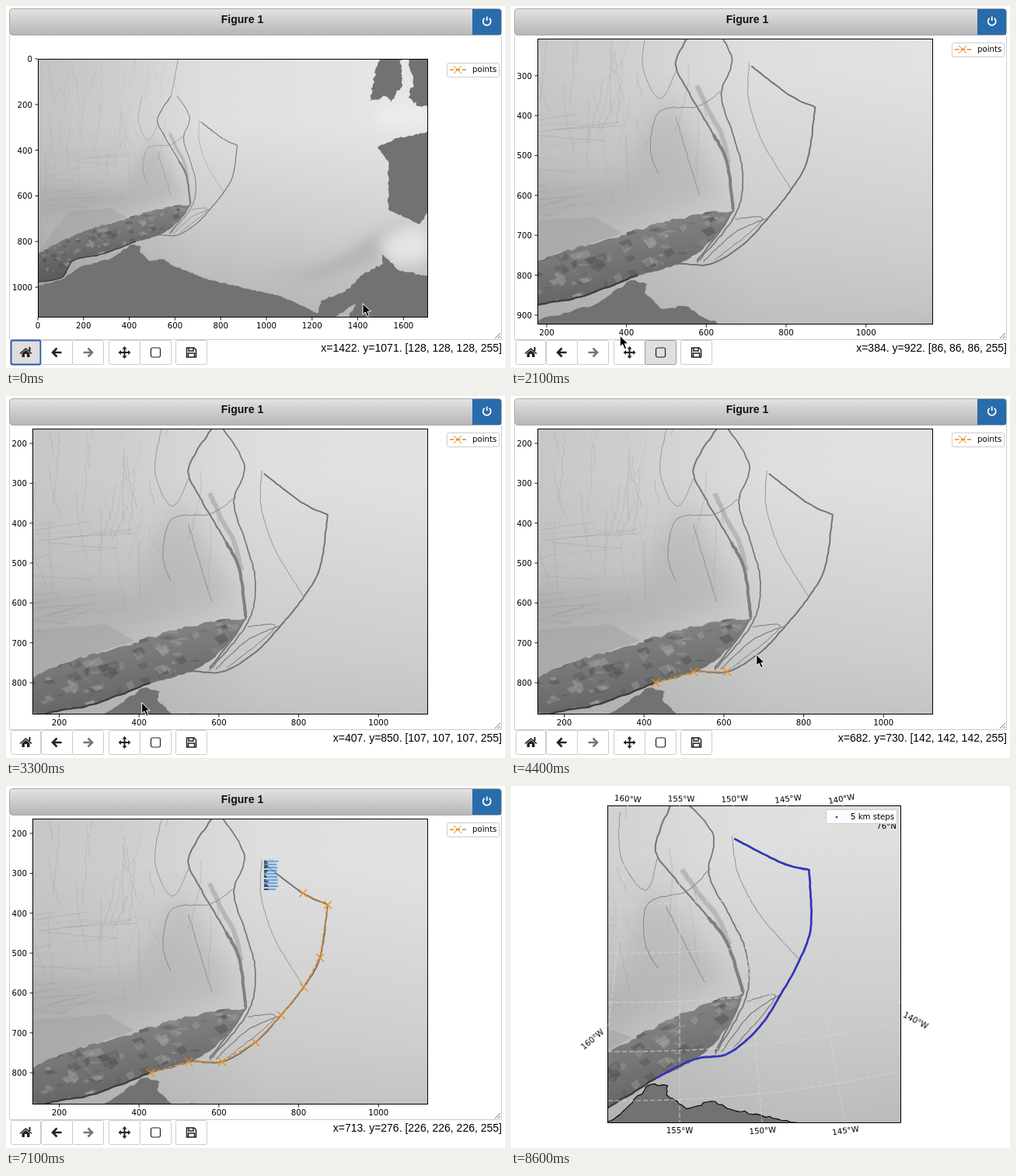
Write an HTML page that moves like this. It is 642 px wide and 466 px high and loops after 9000 ms.

```html
<!DOCTYPE html>
<html lang="en">
<head>
<meta charset="utf-8">
<title>Figure 1</title>
<style>
html, body { margin: 0; width: 100%; height: 100%; overflow: hidden; background: #fff; }
svg { display: block; }
.plot { font: 10.2px "DejaVu Sans", sans-serif; }
.ui { font: 14px "Liberation Sans", Arial, sans-serif; }
</style>
</head>
<body>
<svg id="stage" width="642" height="466" viewBox="0 0 642 466"></svg>
<script>
const LOOP = 9000, MAP_START = 7700, CLICK_START = 3400, CLICK_GAP = 415;
const ORANGE = '#e68a1c', STRIPES_START = 5100;
const stage = document.getElementById('stage');

let seed = 7;
const rnd = () => (seed = (seed * 16807) % 2147483647) / 2147483647;
const span = (a, b) => a + (b - a) * rnd();
const clamp = (v, lo, hi) => Math.min(hi, Math.max(lo, v));
const repeat = (n, f) => Array.from({ length: n }, (_, i) => f(i)).join('');
const parse = s => s.split(' ').map(p => p.split(',').map(Number));

// Roughened curve through a few points; bend 0 keeps the segments straight.
function rough(points, amp = .6, bend = 1, step = 5) {
  const at = i => points[clamp(i, 0, points.length - 1)];
  const out = [at(0)];
  for (let i = 0; i < points.length - 1; i++) {
    const a = at(i), b = at(i + 1), before = at(i - 1), after = at(i + 2);
    const n = Math.ceil(Math.hypot(b[0] - a[0], b[1] - a[1]) / step);
    for (let k = 1; k <= n; k++) {
      const u = k / n, h = u * u * (3 - 2 * u), noise = k < n ? amp : 0;
      out.push([0, 1].map(c => a[c] + (b[c] - a[c]) * (bend ? h : u)
        + bend / 2 * ((b[c] - before[c]) * u * (1 - u) ** 2 - (after[c] - a[c]) * u * u * (1 - u))
        + span(-noise, noise)));
    }
  }
  return 'M' + out.map(p => p.map(v => v.toFixed(1)).join()).join('L');
}
const crack = (points, width, color = '#777', opacity = 1, amp = .6) =>
  `<path d="${rough(points, amp)}" fill="none" stroke="${color}" stroke-width="${width}" opacity="${opacity}"/>`;
const land = (points, amp = 1.2) =>
  `<path class="land" d="${rough(parse(points), amp, 0, 3)}Z" fill="#727272"/>`;
const text = (x, y, s, anchor = 'middle', extra = '') =>
  `<text x="${x}" y="${y}" text-anchor="${anchor}" ${extra}>${s}</text>`;

// The lead that gets digitised: crack, clicked points and final line.
const LEAD = parse('186,369 235,355 278,355 321,330 354,295 383,259 404,221 414,153 382,138 332,100');
const TIP = 7;
const leadPath = () => rough(LEAD.slice(0, TIP + 1), .4) + rough(LEAD.slice(TIP), .4).replace('M', 'L');
const MAIN = parse('265,42 235,93 250,131 283,188 300,222 309,285');
const SHORE = parse('-34,460 20,450 46,412 112,397 186,369');
const BAND_TOP = parse('309,285 235,297 150,322 69,346 -34,395');
const BAND_END = parse('186,369 248,350 292,312 309,285');

function fineLines() {
  const upright = repeat(60, () => {
    const x = span(-20, 275), y = span(-70, 190), len = span(30, 100), lean = span(-25, 20);
    return crack([[x, y], [x + lean * .3, y + len / 2], [x + lean, y + len]], .8, '#858585', span(.1, .4), 1.5);
  });
  const flat = repeat(24, () => {
    const x = span(-34, 90), y = span(170, 310);
    return crack([[x, y], [x + span(50, 130), y + span(-24, 10)]], .8, '#888', span(.15, .4), .8);
  });
  return upright + flat;
}
const bandTexture = () => repeat(170, () => {
  const x = span(-34, 305), y = 393 - x * .27 + span(-42, 42), a = span(4, 14), b = span(2, 9);
  return `<path d="M${x},${y}l${a},${-b * .6} ${a * .4},${b} ${-a * .8},${b * .7}Z" fill="${rnd() < .55 ? '#4c4c4c' : '#a4a4a4'}" opacity="${span(.15, .55)}"/>`;
});

// Zoomed stage pixels to image coordinates.
const FROM_PIXELS = 'matrix(1.947 0 0 1.947 66.6 81.2)';

// Ice scene in image coordinates, 1705 by 1130.
function scene() {
  return `
  <rect width="1705" height="1130" fill="url(#across)"/>
  <rect width="1705" height="1130" fill="url(#down)"/>
  <g filter="url(#soft)">
    <path d="M1000,960Q1250,930 1380,830T1640,700L1540,860 1240,960Z" fill="#999" opacity=".4"/>
    <ellipse cx="1610" cy="820" rx="110" ry="80" fill="#eee" opacity=".7"/>
    <ellipse cx="1600" cy="250" rx="130" ry="60" fill="#f0f0f0" opacity=".6"/>
    <path d="M500,340L640,600 400,660 0,700 0,560 380,560Z" fill="#999" opacity=".3"/>
  </g>
  <g transform="${FROM_PIXELS}" stroke-linejoin="round">
    ${fineLines()}
    <path d="${rough(parse('-34,395 34,301 130,294 165,315 69,346'), 1, 0)}Z" fill="#a2a2a2" opacity=".55"/>
    ${crack(parse('262,125 278,160 294,190 303,225'), 6, '#b0b0b0', .8)}
    <g clip-path="url(#bandClip)">
      <rect x="-40" y="260" width="360" height="210" fill="url(#bandFill)"/>
      ${bandTexture()}
    </g>
    ${crack(SHORE, 2.4, '#3d3d3d')}
    ${crack(MAIN, 2)}
    ${crack(MAIN.slice(3), 4, '#808080')}
    ${crack(parse('309,285 292,312 262,350'), 2)}
    ${crack(parse('282,-72 280,-35 265,42'), 1.3, '#888')}
    ${crack(parse('279,42 307,90 293,137 309,190 321,240 311,292 262,353'), 1.7)}
    <path d="${leadPath()}" fill="none" stroke="#707070" stroke-width="1.9"/>
    ${crack(parse('329,96 328,140 345,195 383,259'), .9, '#909090')}
    ${crack([LEAD[4], [310, 315], [270, 352]], 1.1)}
    ${crack([[311, 297], [346, 298], [285, 350]], 1)}
    ${crack(parse('296,130 262,152 214,158 202,205 212,238'), 1, '#8a8a8a')}
    ${crack(parse('236,105 214,142 192,100 200,42'), .9, '#929292')}
    ${crack(parse('235,165 248,210 265,265'), 1, '#909090')}
  </g>
  <g transform="scale(3.4) translate(-41 -68)">
    ${land('36,362 75,351 95,336 135,325 162,307 174,310 172,316 184,328 202,326 212,333 262,353 355,374 415,402 36,402', .8)}
    ${land('400,402 405,380 437,367 460,345 485,332 484,319 505,340 545,349 545,402 440,402 450,384 420,402')}
    ${land('545,161 505,170 478,182 492,200 492,262 532,281 545,262')}
    ${land('480,66 468,122 488,116 496,124 510,100 508,66', 2)}
    ${land('518,66 524,100 518,118 530,129 545,130 545,66', 2)}
  </g>`;
}

const ICONS = {
  home: '<path d="M-8,1L0,-6 8,1 7,2 0,-4-7,2ZM4,-7h2v5h-2ZM-5,1L0,-3 5,1V6H1.5V2h-3v4H-5Z"/>',
  back: '<path d="M6,0H-5M0,-5.5L-5.5,0 0,5.5" fill="none" stroke="currentColor" stroke-width="2.6"/>',
  forward: '<path d="M-6,0H5M0,-5.5L5.5,0 0,5.5" fill="none" stroke="currentColor" stroke-width="2.6"/>',
  move: '<path d="M0,-8L3,-4.5H1V-1H4.5V-3L8,0 4.5,3V1H1V4.5H3L0,8-3,4.5H-1V1H-4.5V3L-8,0-4.5,-3V-1H-1V-4.5H-3Z"/>',
  rect: '<rect x="-6" y="-6" width="12" height="12" rx="2" fill="none" stroke="currentColor" stroke-width="1.2"/>',
  save: '<path d="M-6,-6H3.5L6,-3.5V6H-6ZM-3.5,-6v4h6v-4M-4,6V1H4v5" fill="none" stroke="currentColor" stroke-width="1.5"/>'
};
const button = (id, x, width = 41, color = '#222') => `
  <rect id="${id}" x="${x + .5}" y="430.5" width="${width - 1}" height="31" rx="2" fill="#fff" stroke="#ccc"/>
  <g transform="translate(${x + width / 2} 446)" fill="${color}" color="${color}">${ICONS[id]}</g>`;
const marker = ([x, y]) => `M${x - 5},${y - 5}l10,10m0,-10l-10,10`;

const CURSORS = {
  arrow: '<path d="M0,0V14L3.3,11 6,17 8.5,16 6,10.2H10.5Z" fill="#000" stroke="#fff"/>',
  cross: '<path d="M-7,3H7M0,-4V10" stroke="#fff" stroke-width="3"/><path d="M-6,3H6M0,-3V9" stroke="#000"/>',
  grab: `<path d="M0,-9L9,0 0,9-9,0Z" fill="#fff"/>${ICONS.move}`,
  stripes: repeat(20, i => `<path d="M0,${i * 2 - 5}H${span(13, 19)}" stroke="${i % 2 ? '#3d86d6' : '#a9d0f3'}" stroke-width="1.3"/>`
    + (i % 3 ? `<path d="M0,${i * 2 - 5}h${span(2, 6)}" stroke="#111" stroke-width="1.2"/>` : ''))
};

const degrees = (x, y, value, turn) =>
  text(x, y, value + '°W', 'middle', `transform="rotate(${turn} ${x} ${y})"`);
const parallels = repeat(6, i => {
  const y = 89 + i * 63.2;
  return `M125,${y}Q320,${y + 2} 501,${y - 38}`;
});
const meridians = 'M150,25Q143,170 125,310M427,25Q457,150 501,280'
  + repeat(3, i => `M${217 + i * 69},25Q${217 + i * 88},215 ${217 + i * 106},433`);
const mapLabels = repeat(5, i => degrees(150 + i * 69, 20, 160 - i * 5, 4 - i * 3.5))
  + repeat(3, i => degrees(217 + i * 107, 447, 155 - i * 5, -i * 4))
  + degrees(107, 329, 160, -40) + degrees(519, 305, 140, 28);

const MAP_MATRIX = [.5346, -.0969, .0969, .5346, -119.8, -10.1];

stage.innerHTML = `
<defs>
  <linearGradient id="across">
    <stop offset="0" stop-color="#c3c3c3"/><stop offset=".2" stop-color="#cdcdcd"/>
    <stop offset=".42" stop-color="#dedede"/><stop offset="1" stop-color="#e7e7e7"/>
  </linearGradient>
  <linearGradient id="down" x2="0" y2="1">
    <stop offset=".25" stop-opacity="0"/><stop offset=".65" stop-opacity=".09"/><stop offset="1" stop-opacity=".2"/>
  </linearGradient>
  <linearGradient id="bandFill" x2=".28" y2="1">
    <stop offset=".2" stop-color="#8c8c8c"/><stop offset=".6" stop-color="#707070"/><stop offset=".85" stop-color="#5c5c5c"/>
  </linearGradient>
  <linearGradient id="bar" x2="0" y2="1"><stop stop-color="#e3e3e3"/><stop offset="1" stop-color="#b5b5b5"/></linearGradient>
  <filter id="soft"><feGaussianBlur stdDeviation="28"/></filter>
  <clipPath id="bandClip"><path d="${rough(SHORE, 0) + rough(BAND_END, 1).replace('M', 'L') + rough(BAND_TOP, 2).replace('M', 'L')}Z"/></clipPath>
  <clipPath id="axesClip"><rect id="clip"/></clipPath>
</defs>
<rect width="642" height="466" fill="#fff"/>
<g clip-path="url(#axesClip)"><g id="image">${scene()}</g></g>
<rect id="axes" fill="none" stroke="#000"/>
<g id="notebook">
  <path d="M4.5,38V429.5H637.5V38" fill="none" stroke="#ccc"/>
  <path d="M629,428l7,-7M633,428l3,-3" stroke="#777"/>
  <rect x="4.5" y="3.5" width="633" height="34" rx="4" fill="url(#bar)" stroke="#aaa"/>
  <path d="M600,4H634q3,0 3,3V37H600Z" fill="#286cab"/>
  <path d="M615.7,15.8a5 5 0 1 0 6,0M618.7,13.5v5.5" fill="none" stroke="#fff" stroke-width="1.7"/>
  <g class="ui">
    ${text(304, 22, 'Figure 1', 'middle', 'font-weight="bold" fill="#111"')}
    <text id="status" x="638" y="445" text-anchor="end"></text>
  </g>
  ${button('home', 6, 39)}${button('back', 45)}${button('forward', 85, 41, '#777')}
  ${button('move', 132)}${button('rect', 172)}${button('save', 218)}
  <g id="ticks" class="plot"></g>
  <g id="legend" class="plot">
    <rect x="567.5" y="-8.5" width="67" height="18" rx="2" fill="#fff" stroke="#ccc"/>
    <path d="M571,0h21" stroke="${ORANGE}" stroke-width="1.5" stroke-dasharray="5.5 2.4"/>
    <path d="${marker([581, 0])}" stroke="${ORANGE}"/>
    ${text(600, 3, 'points', 'start')}
  </g>
  <path id="line" fill="none" stroke="${ORANGE}" stroke-width="1.5" stroke-dasharray="5.5 2.4"/>
  <path id="marks" fill="none" stroke="${ORANGE}" stroke-width="1.2"/>
  <rect id="rubber" fill="none" stroke="#000"/>
  <g id="cursor"></g>
</g>
<g id="map" class="plot">
  <path d="${meridians}${parallels}" fill="none" stroke="#d9d9d9" stroke-width="1.2" stroke-dasharray="6 3" opacity=".7"/>
  <g transform="matrix(${MAP_MATRIX}) ${FROM_PIXELS}">
    <path d="${leadPath()}" fill="none" stroke="#3333bd" stroke-width="2.5" stroke-linecap="round" stroke-linejoin="round"/>
  </g>
  ${text(483, 55, '76°N')}
  <rect x="405.5" y="30.5" width="91" height="18" rx="2" fill="#fff" fill-opacity=".9" stroke="#ccc"/>
  <circle cx="419" cy="40" r="1.5" fill="#4a4ac4"/>
  ${text(437, 43, '5 km steps', 'start')}
  ${mapLabels}
</g>`;

const el = {};
stage.querySelectorAll('[id]').forEach(e => el[e.id] = e);
const set = (e, attrs) => { for (const k in attrs) e.setAttribute(k, attrs[k]); };
const show = (e, on) => set(e, { display: on ? 'inline' : 'none' });

const CORNER = [384, 129], GRAB_X = 149;
const TOOLS = [
  [0, 459, 383], [400, 193, 446], [900, ...CORNER], [1000, ...CORNER], [1500, 138, 288], [1700, 93, 339],
  [2200, 152, 446], [2500, GRAB_X, 343], [2700, 159, 353], [2900, 171, 365], [3100, 152, 446], [CLICK_START, ...LEAD[0]]
];
const clickTime = i => CLICK_START + i * CLICK_GAP;
const MISS = [6100, 427, 182];
const CLICKS = LEAD.map((p, i) => [clickTime(i), ...p]);
CLICKS.splice(TIP, 0, MISS);

const linear = u => u, easeOut = u => 1 - (1 - u) ** 4;
// Interpolates rows of [time, x, y].
function follow(rows, t, ease) {
  const i = rows.findIndex(r => r[0] > t);
  if (i < 0) return rows[rows.length - 1].slice(1);
  const [t0, ...a] = rows[i - 1], [t1, ...b] = rows[i], u = ease((t - t0) / (t1 - t0));
  return a.map((v, k) => v + (b[k] - v) * u);
}
const pointer = t => t < CLICK_START ? follow(TOOLS, t, linear) : follow(CLICKS, t, easeOut);

function drawAxes([x, y, width, height], matrix) {
  set(el.axes, { x: x + .5, y: y + .5, width, height });
  set(el.clip, { x, y, width, height });
  set(el.image, { transform: `matrix(${matrix})` });
}
function drawTicks([x, y, w, h], [s, , , , ox, oy], yStep) {
  const bottom = y + h, tick = d => `<path d="${d}" stroke="#000" stroke-width=".9"/>`;
  let out = '';
  for (let v = 0; v <= 1700; v += 200) {
    const px = ox + v * s;
    if (px >= x - 1 && px <= x + w) out += tick(`M${px},${bottom + 1}v3.5`) + text(px, bottom + 15, v);
  }
  for (let v = 0; v <= 1100; v += yStep) {
    const py = oy + v * s;
    if (py >= y - 1 && py <= bottom) out += tick(`M${x},${py}h-3.5`) + text(x - 7, py + 4, v, 'end');
  }
  el.ticks.innerHTML = out;
}
function drawStatus([x, y, w, h], [s, , , , ox, oy], px, py) {
  const dx = Math.round((clamp(px, x, x + w) - ox) / s);
  const dy = Math.round((clamp(py, y, y + h) - oy) / s);
  const gray = dy > 1000 ? 128 : Math.round(226 - .29 * Math.max(0, dy - 440));
  el.status.textContent = `x=${dx}. y=${dy}. [${gray}, ${gray}, ${gray}, 255]`;
}
function highlight(button, on, stroke = '#999') {
  set(button, { fill: on ? '#dedede' : '#fff', stroke: on ? stroke : '#ccc' });
}
function drawPoints(t, hand) {
  const points = LEAD.filter((_, i) => clickTime(i) <= t);
  if (t >= MISS[0] && t < clickTime(TIP)) points.push(hand);
  set(el.line, { d: points.length ? 'M' + points.join('L') : '' });
  set(el.marks, { d: points.map(marker).join('') });
}

function render(t) {
  const onMap = t >= MAP_START;
  show(el.notebook, !onMap);
  show(el.map, onMap);
  stage.querySelectorAll('.land').forEach(e => set(e, { stroke: onMap ? '#000' : 'none', 'stroke-width': .6 }));
  if (onMap) return drawAxes([124, 25, 377, 408], MAP_MATRIX);

  const zoomed = t >= 1800, [x, y] = pointer(t);
  const pan = t < 2500 ? 0 : t < 2900 ? x - GRAB_X : 22.6;
  const box = zoomed ? [34, 42, 508, 367] : [41, 68, 501, 332];
  const matrix = zoomed ? [.5135, 0, 0, .5135, pan - 56.8, pan - 64.3] : [.294, 0, 0, .294, 41, 68];
  drawAxes(box, matrix);
  drawTicks(box, matrix, zoomed ? 100 : 200);
  drawStatus(box, matrix, x, y);
  drawPoints(t, [x, y]);
  set(el.legend, { transform: `translate(0 ${zoomed ? 56 : 82})` });

  const zooming = t >= 500 && t < 2300, panning = t >= 2300 && t < 3100;
  highlight(el.rect, zooming);
  highlight(el.move, panning);
  highlight(el.home, t < 500, '#2458b8');
  set(el.home, { 'stroke-width': t < 500 ? 2 : 1 });

  show(el.rubber, t > 1000 && !zoomed);
  set(el.rubber, { x: x + .5, y: CORNER[1] + .5, width: Math.max(0, CORNER[0] - x), height: Math.max(0, y - CORNER[1]) });

  const inside = y < box[1] + box[3];
  const kind = t >= STRIPES_START ? 'stripes' : inside && zooming ? 'cross' : inside && panning ? 'grab' : 'arrow';
  el.cursor.innerHTML = CURSORS[kind];
  set(el.cursor, { transform: `translate(${x} ${y})` });
}

const start = performance.now();
function tick() {
  const t = (performance.now() - start) % LOOP;
  render(Math.floor(t / 100) * 100);
  requestAnimationFrame(tick);
}
tick();
</script>
</body>
</html>
```
